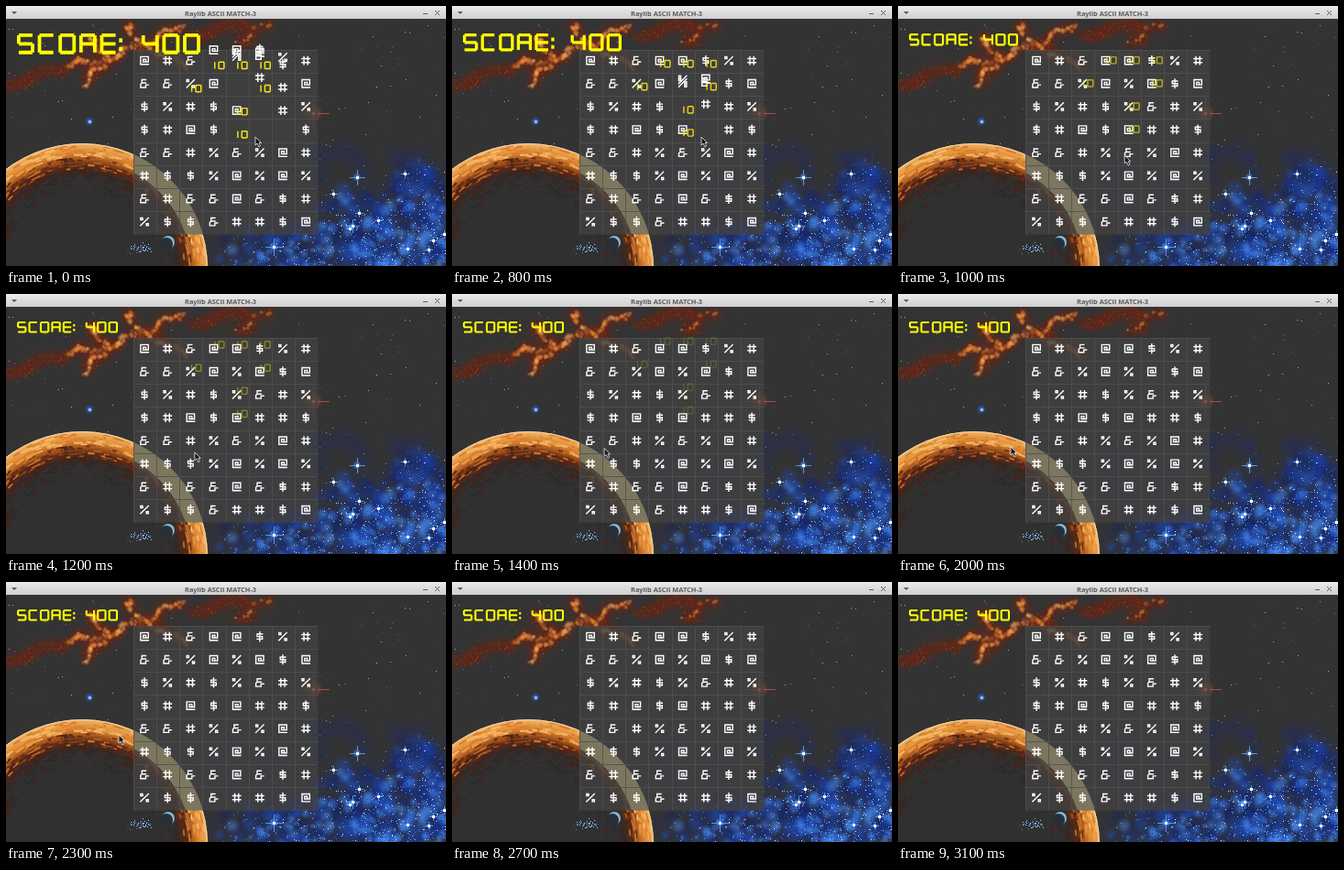
Animation, 480 px wide and 284 px high, one loop 3200 ms. Source, as an HTML page with a canvas:

```html
<!DOCTYPE html>
<html lang="en">
<head>
<meta charset="utf-8">
<title>Raylib ASCII MATCH-3</title>
<style>
html, body { margin: 0; width: 100%; height: 100%; overflow: hidden; background: #333; }
canvas { display: block; }
</style>
</head>
<body>
<canvas id="stage" width="480" height="284"></canvas>
<script>
const W = 480, H = 284, LOOP = 3200, STEP = 100, HOLD = 800;
const GRID = { x: 139, y: 48, cell: 25.15, n: 8 };
const PLANET = { x: 83, y: 287, r: 137 };
const stage = document.getElementById('stage').getContext('2d');

// Score lettering is built from display segments, tiles from single strokes
const SEGMENTS = { a: 'M.5 0H3.5', b: 'M4 .5V2', c: 'M4 3V4.5', d: 'M.5 5H3.5', e: 'M0 3V4.5', f: 'M0 .5V2', g: 'M.5 2.5H3.5' };
const LETTERS = { S: 'afgcd', C: 'afed', O: 'abcdef', R: 'abcefg', E: 'adefg', 4: 'bcfg', 0: 'abcdef', 1: 'ef' };
const ADVANCE = { E: 5.5, ':': 1.5, ' ': 5, 1: 3 };
const SYMBOLS = {
  '@': 'M6 6H0V0H6V4H2V2H4V4',
  '#': 'M1.5 0V6M4.5 0V6M0 1.5H6M0 4.5H6',
  '&': 'M4 0H1V2.5H4M1 2.5L0 3.5V6H4V4H6',
  $: 'M5 1H1V3H5V5H1M3-.5V6.5',
  '%': 'M0 0H1.5V1.5H0ZM6 0L0 6M4.5 4.5H6V6H4.5Z',
  ':': 'M0 1.4V1.6M0 3.9V4.1',
};
const PATHS = {};
for (const ch in SYMBOLS) PATHS[ch] = new Path2D(SYMBOLS[ch]);
for (const ch in LETTERS) PATHS[ch] = new Path2D([...LETTERS[ch]].map(s => SEGMENTS[s]).join(''));

const BOARD = ['@#&@@$%#', '&&%@%@$@', '$%#$%&#%', '$#@$@##$',
               '&&#%&%@#', '#$$%@%@%', '&#&&@&$#', '%$$&##$@'];
const MATCHED = ['...+++', '..+..+', '....+', '....+'];
// New tiles enter from `top`; the ones below them are still `drop` short of their row
const FALLS = {
  3: { fresh: 1, top: 48, drop: 0 },
  4: { fresh: 3, top: 48, drop: 21 },
  5: { fresh: 3, top: 47, drop: 57 },
  6: { fresh: 1, top: 56, drop: 21 },
};

let seed = 7;
const rnd = () => (seed = (seed * 16807) % 2147483647) / 2147483647;
const spread = () => rnd() + rnd() + rnd() - 1.5;
const pick = list => list[Math.floor(rnd() * list.length)];
const repeat = (n, fn) => { for (let i = 0; i < n; i++) fn(i / n); };
const colX = c => GRID.x + GRID.cell * (c + 0.5) - 0.5;
const rowY = r => GRID.y + GRID.cell * (r + 0.5) - 1;

function glyph(g, ch, x, y, size, color) {
  g.save();
  g.translate(x, y);
  g.scale(size, size);
  g.lineCap = 'square';
  g.strokeStyle = color;
  g.stroke(PATHS[ch]);
  g.restore();
}

function pixelText(g, text, x, y, size, color) {
  for (const ch of text) {
    if (ch !== ' ') glyph(g, ch, x + size / 2, y + size / 2, size, color);
    x += (ADVANCE[ch] || 6) * size;
  }
}

function dot(g, x, y, size, color) {
  g.fillStyle = color;
  g.fillRect(Math.round(x), Math.round(y), size, size);
}

function disc(g, x, y, r, color) {
  g.fillStyle = color;
  g.beginPath();
  g.arc(x, y, r, 0, 7);
  g.fill();
}

function glow(g, x, y, r, rgb, alpha) {
  const fill = g.createRadialGradient(x, y, 0, x, y, r);
  fill.addColorStop(0, `rgba(${rgb},${alpha})`);
  fill.addColorStop(1, `rgba(${rgb},0)`);
  g.fillStyle = fill;
  g.fillRect(x - r, y - r, 2 * r, 2 * r);
}

function flare(g, x, y, r, rgb, core) {
  glow(g, x, y, r * 0.6, rgb, 0.8);
  g.fillStyle = `rgba(${rgb},.8)`;
  g.fillRect(x - r, y, 2 * r + 1, 1);
  g.fillRect(x, y - r, 1, 2 * r + 1);
  dot(g, x - 1, y - 1, 3, core);
}

// A wavy thread of hot gas with a dark red halo
function filament(g, [ax, ay], [bx, by], heat) {
  const length = Math.hypot(bx - ax, by - ay);
  const at = u => [ax + (bx - ax) * u + 3 * Math.sin(u * 9), ay + (by - ay) * u + 3 * Math.sin(u * 7)];
  repeat(length / 3, u => glow(g, ...at(u), 7 + 8 * rnd(), '105,36,18', 0.3));
  repeat(length * 3, u => {
    const [x, y] = at(u);
    dot(g, x + spread() * 8, y + spread() * 8, 1, pick(['#6a2614', '#8c3814', '#552018']));
  });
  repeat(length * heat, u => {
    const [x, y] = at(u);
    glow(g, x + spread() * 3, y + spread() * 3, 2 + 2 * rnd(), pick(['214,100,28', '236,140,60', '255,190,110']), 0.6);
  });
}

function fireNebula(g) {
  const hub = [110, 57], fork = [150, 43];
  filament(g, [0, 86], [64, 68], 0);
  filament(g, [200, 32], [262, 20], 0);
  filament(g, [252, 40], [288, 20], 0.2);
  for (const tip of [[66, 64], [84, 86], [90, 34], fork]) filament(g, hub, tip, 0.9);
  for (const tip of [[128, 20], [192, 22], [196, 66]]) filament(g, fork, tip, 0.7);
}

function blueNebula(g) {
  const edge = x => 268 - 100 * Math.max(0, (x - 225) / 255) ** 0.8 + 14 * Math.sin(x / 15);
  const place = power => {
    const x = 225 + 255 * Math.sqrt(rnd()), top = edge(x);
    return [x, top + (H + 4 - top) * rnd() ** power];
  };
  repeat(90, () => glow(g, 225 + 255 * rnd(), 150 + 130 * rnd(), 10 + 12 * rnd(), '28,40,110', 0.2));
  repeat(260, () => glow(g, ...place(0.8), 5 + 11 * rnd(), pick(['20,50,150', '30,80,200', '18,34,100']), 0.45));
  repeat(110, () => glow(g, ...place(0.5), 3 + 6 * rnd(), '70,140,240', 0.55));
  repeat(1300, () => dot(g, ...place(0.75), 1, pick(['#1c3c94', '#2450b8', '#3a74da', '#74a8f0', '#242848'])));
  repeat(140, () => dot(g, ...place(0.6), 1, '#cfe4ff'));
  const star = (x, y, r) => flare(g, Math.round(x), Math.round(y), r, '100,170,255', '#fff');
  star(383, 187, 8);
  star(292, 263, 9);
  star(378, 240, 7);
  repeat(9, () => star(...place(0.8), 4));
}

function planet(g) {
  const { x, y, r } = PLANET;
  const arc = (d, from, to, width, color) => {
    g.lineWidth = width;
    g.strokeStyle = color;
    g.beginPath();
    g.arc(x, y, d, from, to);
    g.stroke();
  };
  const fill = g.createRadialGradient(x, y, r - 40, x, y, r);
  ['#303030', '#3a2620', '#5a2816', '#b4601f', '#e2903c', '#f2b868']
    .forEach((color, i, all) => fill.addColorStop(i / (all.length - 1), color));
  disc(g, x, y, r, fill);
  // Ragged bands of cloud, darker towards the night side
  repeat(900, () => {
    const depth = 50 * rnd() ** 1.2, from = Math.PI * (1 + rnd());
    const tones = depth < 13 ? ['#f4b866', '#d67c2c', '#e8983e']
      : depth < 26 ? ['#a04a1a', '#c8702a', '#4a241a', '#642c16'] : ['#333', '#2c2a2a', '#4a2218'];
    arc(r - 2 - depth, from, from + 0.02 + 0.07 * rnd(), 1 + 1.5 * rnd(), pick(tones));
  });
  arc(r - 0.5, Math.PI, 2 * Math.PI, 1, '#f5d7a8');

  repeat(75, () => dot(g, 146 + spread() * 15, 264 + spread() * 5, 1, pick(['#28477c', '#5f8cc8', '#a4c8e8'])));
  disc(g, 177, 258, 7, '#7cb8dc');
  disc(g, 175, 260, 7, '#2a2e36');
}

function board(g) {
  const { x, y, cell, n } = GRID, size = cell * n;
  g.save();
  g.beginPath();
  g.rect(x, y, size, size);
  g.clip();
  g.fillStyle = 'rgba(66,66,66,.78)';
  g.fillRect(x, y, size, size);
  g.strokeStyle = '#7c765f';
  g.lineWidth = 18;
  g.beginPath();
  g.arc(PLANET.x, PLANET.y, PLANET.r - 9, -1.6, 0);
  g.stroke();
  g.lineWidth = 1;
  g.strokeStyle = 'rgba(80,80,80,.6)';
  for (let i = 0; i <= n; i++) {
    const at = Math.round(i * cell) + 0.5;
    g.strokeRect(x + at, y - 1, 0, size + 2);
    g.strokeRect(x - 1, y + at, size + 2, 0);
  }
  g.restore();
}

function titleBar(g) {
  const fill = g.createLinearGradient(0, 0, 0, 14);
  fill.addColorStop(0, '#ebebeb');
  fill.addColorStop(1, '#cfcfcf');
  g.fillStyle = fill;
  g.fillRect(0, 0, W, 14);
  g.fillStyle = g.strokeStyle = '#5c5c5c';
  g.font = 'bold 7.4px "Open Sans", sans-serif';
  g.textAlign = 'center';
  g.fillText('Raylib ASCII MATCH-3', 234, 10.5);
  g.fill(new Path2D('M6 6H12L9 9Z'));
  g.stroke(new Path2D('M455 8.5H460M468 5L473 10M473 5L468 10'));
}

function makeBackdrop() {
  const canvas = document.createElement('canvas');
  canvas.width = W;
  canvas.height = H;
  const g = canvas.getContext('2d');
  g.fillStyle = '#333';
  g.fillRect(0, 0, W, H);
  repeat(380, () => dot(g, rnd() * W, 14 + rnd() * 270, 1, pick(['#4c4c50', '#5c504a', '#707078', '#a8a8b0', '#4a5068'])));
  fireNebula(g);
  blueNebula(g);
  flare(g, 335, 117, 17, '190,92,56', '#f0a878');
  glow(g, 91, 126, 5, '50,120,255', 0.9);
  dot(g, 90, 125, 3, '#8cc0ff');
  planet(g);
  board(g);
  titleBar(g);
  return canvas;
}

function tileY(c, r, step) {
  const fall = FALLS[c], rest = rowY(r);
  if (!fall || r >= MATCHED.length) return rest;
  const start = r < fall.fresh ? fall.top + 3.5 * r : rest - fall.drop;
  return Math.min(rest, start + 29 * step);
}

function drawTiles(g, step) {
  BOARD.forEach((line, r) => [...line].forEach((ch, c) =>
    glyph(g, ch, colX(c) - 4.2, tileY(c, r, step) - 4.2, 1.4, '#fff')));
}

function drawPops(g, step) {
  g.globalAlpha = Math.max(0, 0.97 - 0.115 * step);
  MATCHED.forEach((line, r) => [...line].forEach((mark, c) => {
    if (mark === '+') pixelText(g, '10', colX(c) + 0.5, rowY(r) + 1 - 1.9 * step, 1.45, '#ffee10');
  }));
  g.globalAlpha = 1;
}

function drawCursor(g, time) {
  if (time > 2300) return;
  const u = Math.min(1, Math.max(0, (time - HOLD) / 1200));
  const ease = 1 - (1 - u ** 1.6) ** 3.1;
  g.save();
  g.translate(272 - 149 * ease, 143 + 24 * ease + 140 * ease * (1 - ease) ** 2);
  const arrow = new Path2D('M0 0V9L2 7L4 11L5.5 10L4 6.5H6.5Z');
  g.fillStyle = '#161616';
  g.strokeStyle = '#d8d8d8';
  g.lineWidth = 0.9;
  g.fill(arrow);
  g.stroke(arrow);
  g.restore();
}

const backdrop = makeBackdrop();

function draw() {
  const time = performance.now() % LOOP;
  const step = time < HOLD ? 0 : Math.floor((time - HOLD) / STEP) + 1;
  stage.drawImage(backdrop, 0, 0);
  drawTiles(stage, step);
  drawPops(stage, step);
  pixelText(stage, 'SCORE: 400', 12, 30, Math.max(110, 200 - 27 * step) / 53, '#ffff00');
  drawCursor(stage, HOLD + (step - 1) * STEP);
  requestAnimationFrame(draw);
}
draw();
</script>
</body>
</html>
```
